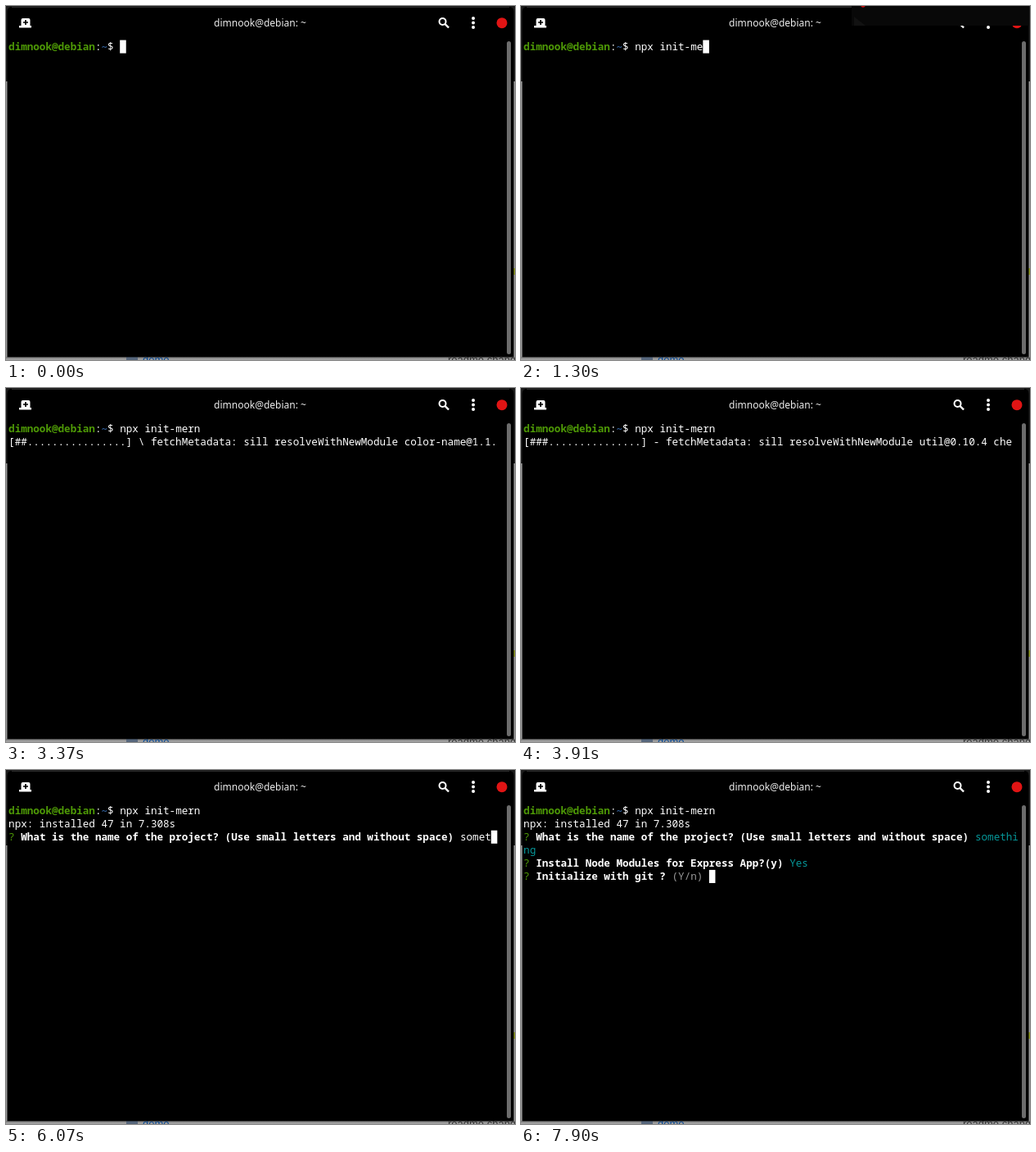
An HTML page that plays this animation: 622 by 432 pixels, repeating every 8 s.

```html
<!DOCTYPE html>
<html lang="en">
<head>
<meta charset="utf-8">
<title>Terminal</title>
<style>
  html, body { margin: 0; width: 100%; height: 100%; overflow: hidden; background: #000; }
  svg { display: block; width: 622px; height: 432px; }
  #term text { font: 12.6px "Noto Sans Mono", monospace; fill: #fff; white-space: pre; }
  #term .bold { font-weight: bold; }
  #term .user { font-weight: bold; fill: #4e9a06; }
  #term .path { font-weight: bold; fill: #3465a4; }
  #term .mark { fill: #4e9a06; }
  #term .answer { fill: #06989a; }
  #term .hint { fill: #9a9a9a; }
  .title { font: 12px "Noto Sans", sans-serif; fill: #eee; text-anchor: middle; }
  .page { font: 13px "Liberation Sans", sans-serif; }
</style>
</head>
<body>
<svg viewBox="0 0 622 432">
  <defs>
    <linearGradient id="shade" x1="0" y1="0" x2="0" y2="1">
      <stop offset="0" stop-color="#777"/>
      <stop offset="1" stop-color="#aaa"/>
    </linearGradient>
  </defs>

  <!-- page behind the window -->
  <rect width="622" height="432" fill="#999"/>
  <rect width="622" height="92" fill="#1c1c1c"/>
  <rect y="428" width="622" height="4" fill="url(#shade)"/>
  <rect x="147" y="427" width="14" height="8" fill="#56667c"/>
  <text class="page" x="167" y="436" fill="#0b4a94">demo</text>
  <text class="page" x="540" y="436" fill="#333">readme changes</text>
  <rect x="620" y="320" width="2" height="8" fill="#8f9a22"/>

  <!-- window -->
  <path d="M1.5 428.5V7q0-6 6-6H614.500q6 0 6 6V428.500z" fill="#000"/>
  <path d="M7 1.500H615" stroke="#2c2c2c"/>
  <text class="title" x="310.500" y="25">dimnook@debian: ~</text>
  <g fill="#fff">
    <path d="M18.500 24V17q0-2 2-2h7q2 0 2 2v7h1.500v2.500h-15V24z"/>
    <path d="M24 17v6M21 20h6" stroke="#000" stroke-width="1.700"/>
    <circle cx="571" cy="15" r="2"/>
    <circle cx="571" cy="20.500" r="2"/>
    <circle cx="571" cy="26" r="2"/>
  </g>
  <g fill="none" stroke="#fff" stroke-width="2">
    <circle cx="533.500" cy="19" r="4"/>
    <path d="M536.500 22l4.500 4.500" stroke-width="2.400"/>
  </g>
  <circle cx="606" cy="20.700" r="6.500" fill="#e01414"/>
  <g id="panel">
    <rect x="404" y="-32" width="217" height="56" fill="#080808"/>
    <path d="M407 24V13l14 11z" fill="#121212"/>
    <circle cx="418" cy="-1" r="2.800" fill="#c81010"/>
  </g>
  <rect x="612" y="43" width="5" height="382" rx="2.500" fill="#6c6c6c"/>
  <g id="term"></g>
</svg>
<script>
const LOOP = 8000, LEFT = 3.1, TOP = 41.6, CW = 7.56, CH = 16.06;
const term = document.getElementById('term');
const panel = document.getElementById('panel');

const COMMAND = 'npx init-mern', PROJECT = 'something';
const commandKeys = [480, 600, 720, 880, 940, 1000, 1060, 1120, 1180, 1240, 1300, 1330, 1360];
const projectKeys = [5050, 5170, 5320, 5470, 6040, 6130, 6220, 6310, 6400];
const blinks = [[2230, 2410], [4630, 4810], [5630, 5810], [6700, 6850], [6910, 7090]];

// start time, filled cells, message
const resolve = name => 'fetchMetadata: sill resolveWithNewModule ' + name + ' checking installable status';
const steps = [
  [2560, 0, 'rollbackFailedOptional: verb npm-session 4be17c0d92a6f358'],
  [2920, 1, resolve('inquirer@7.1.0')],
  [3040, 1, resolve('chalk@3.0.0')],
  [3130, 2, resolve('ansi-styles@4.2.1')],
  [3220, 2, resolve('color-convert@2.0.1')],
  [3340, 2, resolve('color-name@1.1.4')],
  [3460, 2, resolve('rxjs@6.5.5')],
  [3580, 2, resolve('string-width@4.2.0')],
  [3700, 3, resolve('strip-ansi@6.0.0')],
  [3790, 3, resolve('inherits@2.0.3')],
  [3880, 3, resolve('util@0.10.4')],
  [4000, 5, resolve('path@0.12.7')],
  [4120, 9, 'extract:rxjs: sill extract rxjs@6.5.5'],
  [4240, 14, 'extract:lodash: sill extract lodash@4.17.15']
];

const typed = (text, keys, t) => text.slice(0, keys.filter(k => k <= t).length);

function progress(t) {
  const [, done, message] = steps.filter(s => s[0] <= t).pop();
  const turn = Math.floor((t - 3370) / 75) & 3;
  const bar = '[' + '#'.repeat(done) + '.'.repeat(18 - done) + ']';
  return (bar + ' ' + '\\|/-'[turn] + ' ' + message).slice(0, 79);
}

function screen(t) {
  const runs = [];
  let cursor = null;
  const put = (row, col, text, kind = '') => runs.push({ row, col, text, kind });
  const ask = (row, text) => {
    put(row, 0, '?', 'mark');
    put(row, 2, text, 'bold');
  };

  const command = typed(COMMAND, commandKeys, t);
  put(0, 0, 'dimnook@debian', 'user');
  put(0, 14, ':');
  put(0, 15, '~', 'path');
  put(0, 16, '$ ' + command);

  if (t < 1600) cursor = [0, 18 + command.length];
  else if (t < 2560) cursor = [1, 0];
  else if (t < 4390) put(1, 0, progress(t));
  else {
    put(1, 0, 'npx: installed 47 in 7.308s');
    cursor = [2, 0];
  }

  if (t >= 4540) {
    const name = typed(PROJECT, projectKeys, t);
    const kind = t >= 6580 ? 'answer' : '';
    ask(2, 'What is the name of the project? (Use small letters and without space)');
    put(2, 73, name.slice(0, 7), kind);
    put(3, 0, name.slice(7), kind);
    cursor = name.length < 7 ? [2, 73 + name.length] : [3, name.length - 7];
  }
  if (t >= 6580) cursor = [4, 0];
  if (t >= 6640) {
    ask(4, 'Install Node Modules for Express App?(y)');
    if (t < 7690) {
      const key = t >= 7330 ? 'y' : '';
      put(4, 43, '(Y/n)', 'hint');
      put(4, 49, key);
      cursor = [4, 49 + key.length];
    } else {
      put(4, 43, 'Yes', 'answer');
      cursor = [5, 0];
    }
  }
  if (t >= 7900) {
    ask(5, 'Initialize with git ?');
    put(5, 24, '(Y/n)', 'hint');
    cursor = [5, 30];
  }
  if (blinks.some(([from, to]) => t >= from && t < to)) cursor = null;
  return { runs, cursor };
}

function node(tag, attrs, text = '') {
  const el = document.createElementNS('http://www.w3.org/2000/svg', tag);
  for (const key in attrs) el.setAttribute(key, attrs[key]);
  el.textContent = text;
  return el;
}

const ease = (t, from, to) => {
  const p = Math.min(1, Math.max(0, (t - from) / (to - from)));
  return p * p * (3 - 2 * p);
};

let shown = '';
function draw(t) {
  const drop = ease(t, 30, 750) - ease(t, 1510, 2050);
  panel.setAttribute('transform', `translate(0 ${(drop - 1) * 26})`);
  panel.setAttribute('visibility', drop > 0 ? 'visible' : 'hidden');

  const state = screen(t), key = JSON.stringify(state);
  if (key === shown) return;
  shown = key;
  term.replaceChildren(...state.runs.filter(r => r.text).map(r => node('text', {
    x: LEFT + r.col * CW, y: TOP + r.row * CH + 12.2, class: r.kind
  }, r.text)));
  if (state.cursor) {
    const [row, col] = state.cursor;
    term.append(node('rect', {
      x: LEFT + col * CW, y: TOP + row * CH, width: CW, height: CH, fill: '#fff'
    }));
  }
}

const start = performance.now();
function tick() {
  draw((performance.now() - start) % LOOP);
  requestAnimationFrame(tick);
}
tick();
</script>
</body>
</html>
```
